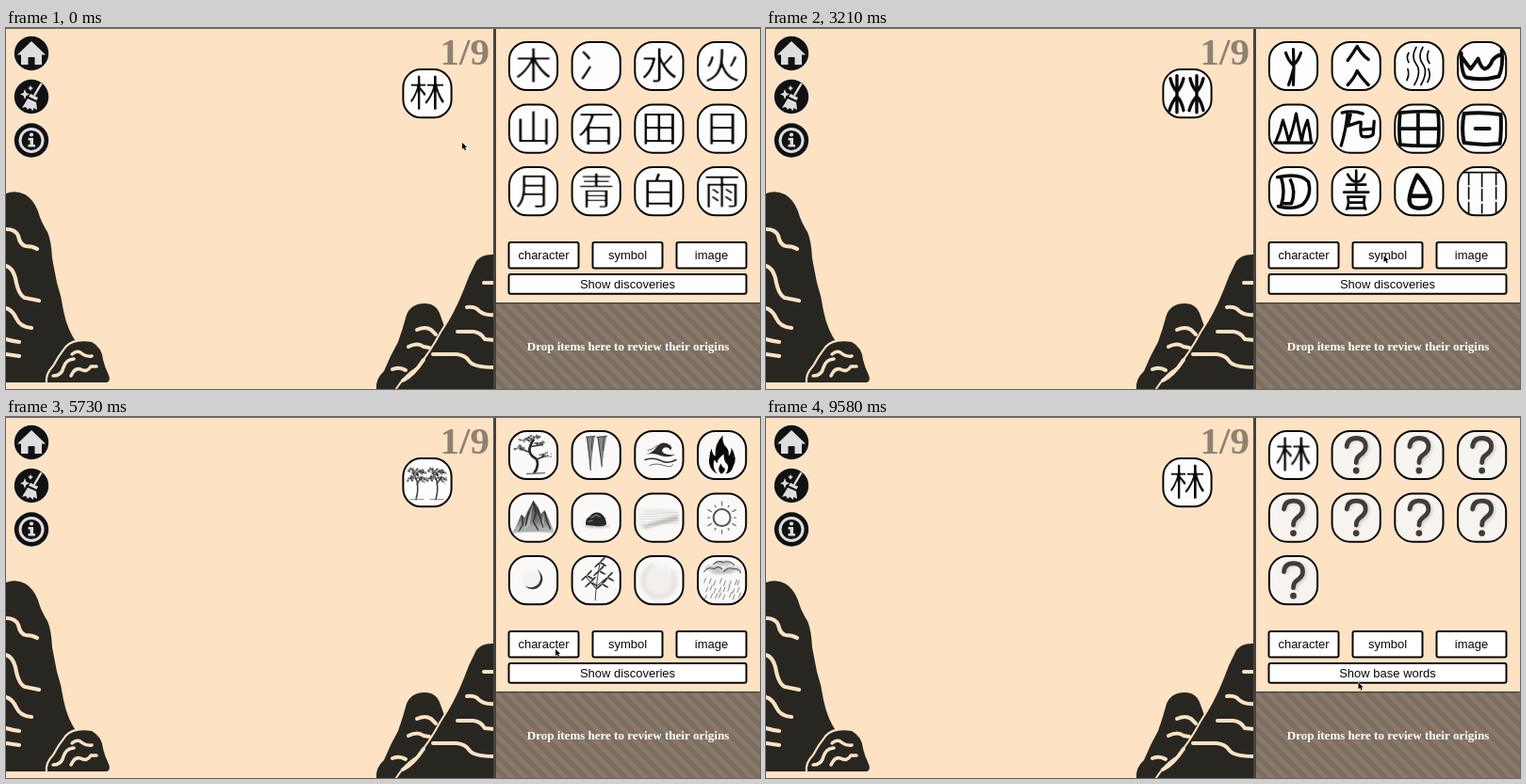
An HTML page with a canvas for the animation above (9.61 s loop, 800 by 384 pixels).

```html
<!DOCTYPE html>
<html lang="en">
<head>
<meta charset="utf-8">
<title>Character builder</title>
<style>
html, body { margin: 0; width: 100%; height: 100%; overflow: hidden; background: #fde2c3; }
canvas { display: block; }
</style>
</head>
<body>
<canvas id="stage" width="800" height="384"></canvas>
<script>
const W = 800, H = 384, LOOP = 9610;
const SAND = '#fde2c3', ROCK = '#272620';
const stage = document.getElementById('stage').getContext('2d');

function layer(w, h, draw) {
  const canvas = document.createElement('canvas');
  canvas.width = w;
  canvas.height = h;
  draw(canvas.getContext('2d'));
  return canvas;
}

function fill(c, d, color) {
  c.fillStyle = color;
  c.fill(new Path2D(d));
}

function line(c, d, width, color = '#0b0b0b') {
  c.strokeStyle = color;
  c.lineWidth = width;
  c.lineCap = c.lineJoin = 'round';
  c.stroke(new Path2D(d));
}

function dot(c, x, y, rx, color, ry = rx, turn = 0) {
  c.fillStyle = color;
  c.beginPath();
  c.ellipse(x, y, rx, ry, turn, 0, Math.PI * 2);
  c.fill();
}

function label(c, text, x, y, font, color, align = 'center') {
  c.font = font;
  c.fillStyle = color;
  c.textAlign = align;
  c.fillText(text, x, y);
}

function soft(c, blur, draw) {
  c.save();
  c.filter = `blur(${blur}px)`;
  draw();
  c.restore();
}

function randomizer(seed) {
  return () => (seed = (seed * 16807) % 2147483647) / 2147483647;
}

// ---- scenery ----

function leftMountain(c) {
  fill(c, 'M0 176Q10 172 20 177Q29 182 34 195Q37 206 44 217Q48 226 49 245L54 271Q59 286 61 301Q65 321 75 335L48 377H0Z', ROCK);
  line(c, 'M0 214Q10 214 13 221Q15 231 21 232Q28 232 33 235M0 253Q7 255 10 266Q13 284 20 287L35 290' +
    'M0 298Q7 300 11 309Q15 318 27 319M0 331Q7 333 14 334M0 347L14 349', 4.2, SAND);
  const rock = 'M44 377Q43 368 51 360Q56 350 64 340Q72 331 91 334Q102 340 103 353Q105 361 108 367Q112 375 107 377Z';
  line(c, rock, 4.4, SAND);
  fill(c, rock, ROCK);
  fill(c, 'M0 377H112V382H0Z', SAND);
  line(c, 'M50 370Q59 370 61 361Q63 353 72 352M70 347Q76 342 80 346Q85 350 91 349' +
    'M69 370Q73 361 79 363Q86 367 90 360L96 360', 3.5, SAND);
}

function rightMountains(c) {
  fill(c, 'M393 384Q392 373 401 365Q408 348 416 334Q421 320 425 305Q430 293 444 293Q457 293 461 306L466 320L430 384Z', ROCK);
  const peak = 'M415 384Q424 370 437 362Q451 345 462 324Q476 303 485 280Q491 263 499 248Q505 240 518 241V384Z';
  line(c, peak, 4, SAND);
  fill(c, peak, ROCK);
  line(c, 'M507 271H518M489 297Q498 296 502 301Q508 306 518 305M479 323L496 323Q504 324 508 331L518 332' +
    'M453 347H478Q488 348 492 355Q497 361 518 361M436 321Q445 317 451 321L456 326M427 339Q437 334 443 339L449 340' +
    'M410 363Q418 360 424 364M421 375Q432 370 443 353', 4, SAND);
}

function iconButtons(c) {
  for (const y of [27, 73, 119.5]) {
    dot(c, 27, y, 19.2, '#f3e9dc');
    dot(c, 27, y, 18.2, '#111');
  }
  const pale = '#dedede';
  fill(c, 'M12 28.5L27 14L42 28.5H38V39H30.5V31H23.5V39H16V28.5Z', pale);
  line(c, 'M37 60L30.5 71', 2.4, pale);
  fill(c, 'M26 70L34 74L32.5 77L24 73Z', pale);
  fill(c, 'M23 75L32 79L33 87L29 85V88L25 85L23 87L21 84L17 85Z', pale);
  fill(c, 'M20 65L21.5 69L25 70.5L21.5 72L20 76L18.5 72L15 70.5L18.5 69Z', pale);
  fill(c, 'M26 61L27 63L29 64L27 65L26 67L25 65L23 64L25 63Z', pale);
  c.strokeStyle = pale;
  c.lineWidth = 3;
  c.beginPath();
  c.arc(27, 119.5, 12, 0, Math.PI * 2);
  c.stroke();
  dot(c, 27, 113.5, 2.1, pale);
  fill(c, 'M23.5 117H29V124H31V126.5H23.5V124H25.5V119.5H23.5Z', pale);
}

function dropArea(c) {
  c.save();
  c.beginPath();
  c.rect(520, 293, 280, 91);
  c.clip();
  c.fillStyle = '#897a6a';
  c.fillRect(520, 293, 280, 91);
  c.translate(520, 384);
  c.rotate(-Math.PI / 4);
  c.fillStyle = '#7b6e60';
  for (let x = 5; x < 280; x += 10) c.fillRect(x, -300, 5, 600);
  c.restore();
  c.fillStyle = '#3c3732';
  c.fillRect(520, 292, 280, 1.2);
  label(c, 'Drop items here to review their origins', 660, 343, 'bold 13px "Liberation Serif", serif', '#fff');
}

function box(c, x, y, w, h, r, color) {
  c.beginPath();
  c.roundRect(x, y, w, h, r);
  c.fillStyle = color;
  c.fill();
  c.strokeStyle = '#080808';
  c.lineWidth = 2;
  c.stroke();
}

function button(c, text, x, y, w, h) {
  box(c, x + 1, y + 1, w - 2, h - 2, 2, '#fff');
  label(c, text, x + w / 2, y + h / 2 + 4.3, '13px "Liberation Sans", sans-serif', '#080808');
}

const scenery = layer(W, H, c => {
  c.fillStyle = SAND;
  c.fillRect(0, 0, W, H);
  leftMountain(c);
  rightMountains(c);
  iconButtons(c);
  label(c, '1/9', 513, 39, 'bold 41px "Liberation Serif", serif', '#8f8170', 'right');
  dropArea(c);
  c.fillStyle = '#48423d';
  c.fillRect(517, 0, 3, H);
  c.fillStyle = '#71685f';
  c.fillRect(0, 0, W, 1);
  button(c, 'character', 532.5, 227, 76, 29.5);
  button(c, 'symbol', 621.5, 227, 76, 29.5);
  button(c, 'image', 710.5, 227, 76, 29.5);
});

// ---- tile faces, drawn around (0, 0) ----

// Trimming the glyph against a shifted copy thins its horizontal strokes.
function glyph(c, char) {
  const face = layer(56, 56, g => {
    const write = (x, y) => label(g, char, x, y, '39px "Noto Sans CJK SC", "Noto Sans CJK JP", sans-serif', '#0b0b0b');
    write(28, 40.8);
    g.globalCompositeOperation = 'destination-in';
    write(28.2, 41.7);
  });
  c.drawImage(face, -28, -28);
}

const SYMBOLS = [
  ['M0-18Q1 0 0 20M-8-14Q-5-5 0-1M8-14Q5-5 0-1M-5 20Q-2 12 0 4', 3.2],
  ['M-9-6Q-3-14 1-21Q5-13 13-7M-9 20Q-2 13 1 5Q5 12 13 20', 3.4],
  ['M-3-20Q-9-10-3-2T-5 20M4-20Q-2-10 4-2T2 20M-11-14Q-14-9-11-4M-12 3Q-10 9-13 15M10-16Q7-9 11-3M10 3Q13 10 9 17', 1.7],
  ['M-22-14Q-22 8-17 12Q0 16 18 11Q23 0 21-17M-21-9Q-16-2-12 3Q-8-2-4-8Q-1 2 3 3Q8 2 11-6Q15-11 20-12', 3.9],
  ['M-20 15H20M-19 15Q-14 4-11-9Q-7 4-5 13Q0 0 3-16Q6 1 9 13Q11 0 15-9Q18 4 19 15', 3.1],
  ['M-15-17Q-4-20 7-16M-9-17Q-11 2-16 18M-6-15L-9-3L3-7M5-7Q4 6 6 8Q14 10 18 6L19-8M6 1L18 0', 3.3],
  ['M-20-17Q0-19 20-18Q22 0 20 18Q0 19-20 17Q-22 0-20-17M-1-18V18M-21 0H21', 3.7],
  ['M-19-16Q0-18 20-15Q21 2 19 16Q0 18-19 15Q-22 0-19-16M-7 0H8', 4],
  ['M-17-15Q8-20 16-10Q20 4 10 14Q0 20-16 16M-13-15Q-8 0-13 15M-3-12Q3 0-2 13L-10 13', 3.5],
  ['M0-22V0M-9-18Q-5-10 0-10Q6-10 9-18M-10-7H10M-13 1H13M-9 6H9M-9 6Q-7 13-10 19M9 6Q7 13 10 19M-8 12H8M-9 18H9', 2.7],
  ['M-2-17Q9-5 12 7Q13 18 0 18Q-12 18-10 6Q-8-5-2-17M-7 5H8', 4.4],
  ['M-20-20H20M-14-20V-7M-14-4V8M-14 12V23M0-20V-5M0-2V10M0 14V23M15-20V-7M15-4V8M15 12V23', 1.7]
];

function foliage(c, seed, clumps) {
  const rand = randomizer(seed);
  for (const [x, y, w, h] of clumps) {
    for (let i = 0; i < 20; i++) {
      dot(c, x + (rand() + rand() - 1) * w, y + (rand() + rand() - 1) * h, 0.6 + rand() * .8, i % 3 ? '#333a' : '#777a');
    }
  }
}

function leaf(c, x, y, angle, length) {
  dot(c, x + Math.cos(angle) * length / 2, y + Math.sin(angle) * length / 2, length / 2, '#333', .9, angle);
}

const IMAGES = [
  c => {
    line(c, 'M1 19Q7 10 3 4Q-5 0-4-7Q-3-12 0-16', 2.8, '#252525');
    line(c, 'M3 5Q9 2 13 1M-4-3L-14-7M-3-9L10-11', 1.4, '#333');
    line(c, 'M-7 20L12 19', 1.3, '#777');
    foliage(c, 31, [[-7, -16, 9, 3], [6, -12, 9, 3], [-14, -8, 6, 3], [13, 0, 7, 3], [1, -19, 7, 2]]);
  },
  c => {
    for (const [x, w, tip] of [[-6, 4.5, 18], [6, 5, 14]]) {
      fill(c, `M${x - w}-19L${x + w}-20L${x + 2}-2L${x} ${tip}L${x - 2} 0Z`, '#888');
      line(c, `M${x - w + 1}-18L${x - 1} 4L${x} ${tip - 2}M${x + 2}-18L${x + 1}-5`, 1, '#444');
      line(c, `M${x - w}-19L${x + w}-20`, 1.6, '#555');
    }
  },
  c => {
    fill(c, 'M-16 0Q-7-2-3-8Q3-16 11-11Q15-8 12-5Q10-9 6-8Q1-6 5-2Q11 1 18-1Q9 4 0 0Q-7-3-16 0Z', '#2b2b2b');
    line(c, 'M-15 5Q-6 2 2 6T18 5', 1.5, '#333');
    line(c, 'M-10 11Q-3 8 5 11T15 10M-12-5Q-6-6-2-10', 1, '#666');
  },
  c => {
    fill(c, 'M-5 20Q-16 14-13 1Q-13-3-11-7Q-10 0-7 1Q-8-12 1-21Q0-12 5-8Q8-4 7 1Q10-2 10-8Q17 4 12 12Q10 19 4 20Q9 12 4 8Q2 5 2-1Q-5 4-5 9L-8 5Q-11 13-5 20Z', '#080808');
    fill(c, 'M-1 20Q-6 15-1 9Q0 13 3 14Q4 18-1 20Z', '#080808');
  },
  c => {
    const shade = c.createLinearGradient(0, -20, 0, 18);
    shade.addColorStop(0, '#333');
    shade.addColorStop(.6, '#777');
    shade.addColorStop(1, '#ddd');
    fill(c, 'M-22 16Q-17 7-13-3L-9 0L-6-7L0-18L5-11L8-4L12-8L16 1L22 15Z', shade);
    fill(c, 'M0-16L-4 8L-9 13L-5 0ZM11-5L11 8L7 12Z', '#d8d4ce99');
    line(c, 'M0-17L3-5L0 4L5 13M4-10L8 2L10 10M-12-2L-11 7L-15 14M12-6L15 5L18 12M-5-6L-8 8', 1.5, '#222c');
    soft(c, 1, () => line(c, 'M-22 15Q0 11 22 16', 2, '#8888'));
  },
  c => {
    soft(c, 1, () => dot(c, 1, 9, 14, '#9998', 2));
    fill(c, 'M-11 8Q-12 1-7-1Q-3-7 4-5Q10-2 11 7Q8 10 0 9Z', '#282828');
    line(c, 'M-5 0L0-3L4-1M-8 4L-4 3', 1.4, '#777');
  },
  c => {
    soft(c, 1.5, () => {
      dot(c, 0, -7, 20, '#bbb6', 1.5);
      fill(c, 'M-20 10Q0 3 20-3V3Q0 7-14 12Z', '#c4bfb6');
    });
    for (let i = 0; i < 5; i++) line(c, `M-21 ${i * 3 - 4}Q${i * 3 - 9} ${i * 2 - 3} 21 ${i * 3 - 6}`, .7, '#8886');
  },
  c => {
    c.strokeStyle = '#555';
    c.lineWidth = 2;
    c.beginPath();
    c.arc(0, 0, 9, 0, Math.PI * 2);
    c.stroke();
    for (let i = 0; i < 12; i++) {
      c.save();
      c.rotate(i * Math.PI / 6);
      line(c, `M0-13V${i % 2 ? -15 : -17}`, 1.3, '#777');
      c.restore();
    }
  },
  c => {
    soft(c, 1.5, () => dot(c, -1, 0, 10, '#eeea'));
    fill(c, 'M4-12Q14-3 7 6Q0 13-9 6Q0 10 6 3Q10-4 4-12Z', '#3a3a3a');
  },
  c => {
    line(c, 'M-1 21Q0 3 4-19M0 9Q-7 1-11-4M1 6Q7 0 13-3', 1.1, '#555');
    for (const [x, y] of [[4, -19], [3, -10], [-10, -5], [-6, 2], [12, -3], [6, 4]]) {
      for (const a of [-.8, .5, 2.4]) leaf(c, x, y, a, 8);
    }
  },
  c => soft(c, 2, () => {
    dot(c, 0, 0, 15, '#f2efec');
    c.strokeStyle = '#ccc6c0';
    c.lineWidth = 2.2;
    c.beginPath();
    c.ellipse(0, 0, 17, 18, 0, -.6, 4.4);
    c.stroke();
  }),
  c => {
    soft(c, 1, () => {
      for (const [x, y, r] of [[-9, -13, 9], [1, -18, 9], [11, -12, 9], [0, -9, 12]]) dot(c, x, y, r, '#aaaa', 2.6);
    });
    line(c, 'M-19-9Q-15-15-8-12Q-4-16 0-12M-9-17Q-4-22 1-19Q8-22 13-16M2-9Q7-15 12-12Q18-13 20-8', 1.1, '#555');
    const rand = randomizer(77);
    for (let i = 0; i < 24; i++) {
      const x = -17 + i % 8 * 5 + rand() * 3, y = -3 + Math.floor(i / 8) * 8 + rand() * 4;
      line(c, `M${x} ${y}l-2 5`, .9, '#777');
    }
  }
];

function question(c) {
  soft(c, 1, () => line(c, 'M-8-9Q-8-17 2-17Q12-17 12-8Q12-2 5 3Q2 5 2 9', 5, '#aaa6'));
  line(c, 'M-10-9Q-9-18 0-18Q10-18 10-9Q10-4 4 0Q0 3 0 8', 4.8, '#403d38');
  dot(c, 0, 16.5, 3.4, '#403d38');
}

// ---- boards ----

function tile(c, x, y, draw, color = '#fdfdfd') {
  c.save();
  c.translate(x, y);
  box(c, -25.6, -25.6, 51.2, 51.2, 19, color);
  c.beginPath();
  c.roundRect(-25, -25, 50, 50, 18);
  c.clip();
  draw(c);
  c.restore();
}

function board(faces, woods, toggle, color) {
  return layer(W, H, c => {
    c.drawImage(scenery, 0, 0);
    tile(c, 447, 69.7, woods);
    faces.forEach((face, i) => {
      tile(c, 559.5 + i % 4 * 66.7, 40.5 + Math.floor(i / 4) * 66.6, face, face === question ? '#f7f3ef' : color);
    });
    button(c, toggle, 532.5, 261, 254, 22.7);
  });
}

function paired(draw) {
  return c => {
    for (const x of [-11, 10]) {
      c.save();
      c.translate(x, 0);
      draw(c);
      c.restore();
    }
  };
}

const write = char => c => glyph(c, char);
const woodsGlyph = write('林');
const woodsSymbol = paired(c => line(c, 'M0-19V20M-7-16Q-5-7 0-2Q5-7 7-16M-8 18Q-5 8 0 3Q5 8 7 18', 3.4));
const woodsImage = paired(c => {
  line(c, 'M-1 18Q2 8 0-2L-4-10M0 2L5-6', 1.6, '#444');
  line(c, 'M-7 18H7', 1, '#888');
  foliage(c, 53, [[-4, -13, 6, 4], [4, -12, 6, 4], [-5, -4, 5, 4], [6, -3, 5, 4], [0, -8, 8, 5]]);
});

const SHOW = 'Show discoveries';
const characters = board([...'木冫水火山石田日月青白雨'].map(write), woodsGlyph, SHOW);
const symbols = board(SYMBOLS.map(([d, w]) => c => line(c, d, w)), woodsSymbol, SHOW);
const images = board(IMAGES, woodsImage, SHOW, '#fbf9f8');
const discoveries = board([woodsGlyph, ...Array(8).fill(question)], woodsGlyph, 'Show base words');

const SCENES = [[7790, discoveries], [6030, characters], [4640, images], [3180, symbols], [0, characters]];

// ---- pointer: time, x, y ----

const POINTER = [
  [0, 484, 122], [730, 484, 122], [1240, 566, 238], [1550, 566, 238], [1610, 571, 241.5],
  [1970, 571, 241.5], [2350, 614, 248], [2730, 655.5, 242], [3550, 655.5, 242],
  [3850, 778, 248], [4090, 741, 242], [4970, 741, 242], [5030, 666.5, 235],
  [5520, 579.5, 244], [5670, 579.5, 244], [5730, 583, 247], [6560, 583, 247],
  [7030, 623, 273], [9390, 623, 273], [9580, 628.5, 282.5], [LOOP, 628.5, 282.5]
];

function pointerAt(t) {
  const i = POINTER.findIndex(key => key[0] > t);
  const [t0, x0, y0] = POINTER[i - 1], [t1, x1, y1] = POINTER[i];
  const p = (t - t0) / (t1 - t0), k = p * p * (3 - 2 * p);
  return [x0 + (x1 - x0) * k, y0 + (y1 - y0) * k];
}

function drawPointer(c, x, y) {
  c.save();
  c.translate(x, y);
  const arrow = 'M0 0V7L1.7 5.5L3 8.2L4.2 7.6L3 5.1H5.2Z';
  line(c, arrow, .9, '#fffc');
  fill(c, arrow, '#000');
  c.restore();
}

const start = performance.now();
function frame(now) {
  const t = Math.max(0, now - start) % LOOP;
  stage.drawImage(SCENES.find(([from]) => t >= from)[1], 0, 0);
  drawPointer(stage, ...pointerAt(t));
  requestAnimationFrame(frame);
}
frame(start);
</script>
</body>
</html>
```
